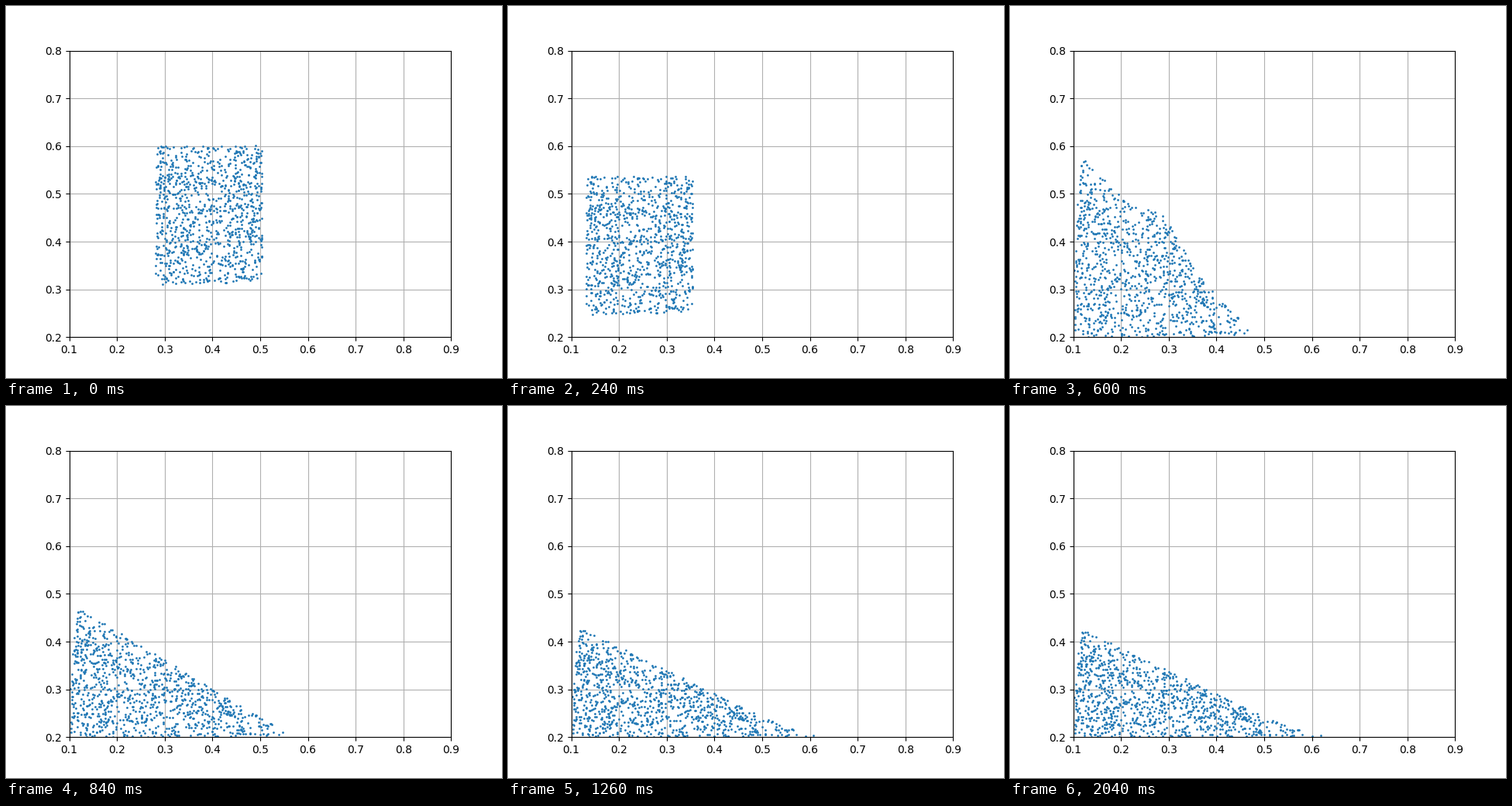
Recreate the animation shown at these times as a matplotlib script. Size 640x480 px, loop 2.1 s.

```python
import numpy as np
import matplotlib.pyplot as plt
from matplotlib.animation import FuncAnimation

FRAMES, INTERVAL = 70, 30
COUNT = 1000
FLOOR, WALL = 0.2, 0.102
IMPACT, REST = 9.3, 68      # in frames
VX = -0.01875               # block velocity per frame

rng = np.random.default_rng(12)
u, v = rng.random((2, COUNT))


def block(t):
    """Rigid block of sand in free flight."""
    x = 0.2805 + 0.2245 * u + VX * t
    y = 0.3107 + 0.29 * v - 0.0035 * t - 0.00056 * t**2
    return np.array([x, y])


# Equal-area map of the unit square to a right triangle,
# then to column rank and relative height.
low = u > v
tx = np.where(low, u - v / 2, u / 2)
ty = np.where(low, v / 2, v - u / 2)
rank = 1 - (1 - tx)**2
level = ty / (1 - tx)


def heap(slope, foot, soft, bulge=0):
    """Spread the grains evenly below a slope that runs out softly at its foot."""
    def surface(x):
        h = slope * soft * np.logaddexp(0, (foot - x) / soft)
        h += bulge * np.exp(-((x - 0.29) / 0.05)**2)
        return h * (1 - 0.55 * np.exp(-((x - 0.1) / 0.011)**2))

    xs = np.linspace(WALL, foot + 5 * soft, 800)
    area = np.cumsum(surface(xs))
    x = np.interp(rank, (area - area[0]) / (area[-1] - area[0]), xs)
    return np.array([x, FLOOR + level * surface(x)])


times = np.array([IMPACT, 20, 28, 35, 51, REST])
poses = np.array([
    block(IMPACT),
    heap(1.03, 0.485, 0.002, bulge=0.05),
    heap(0.60, 0.570, 0.006),
    heap(0.50, 0.585, 0.022),
    heap(0.48, 0.590, 0.031),
    heap(0.478, 0.590, 0.031),
])


def tangents():
    """Monotone slopes, with a free one at the top of the splash."""
    s = np.diff(poses, axis=0) / np.diff(times)[:, None, None]
    a, b = s[:-1], s[1:]
    same = a * b > 0
    d = np.zeros_like(poses)
    d[1:-1] = np.where(same, 2 * a * b / np.where(same, a + b, 1), 0)
    d[1] = np.gradient(poses, times, axis=0)[1]
    d[0] = [VX * u, -0.0139 * (0.3 + 0.4 * u)]
    return d


slopes = tangents()


def grains(t):
    if t <= IMPACT:
        return block(t)
    k = min(np.searchsorted(times, t, side="right") - 1, len(times) - 2)
    dt = times[k + 1] - times[k]
    s = (t - times[k]) / dt
    p = (poses[k] * (1 + 2 * s) * (1 - s)**2
         + poses[k + 1] * s**2 * (3 - 2 * s)
         + slopes[k] * dt * s * (1 - s)**2
         - slopes[k + 1] * dt * s**2 * (1 - s))
    return np.maximum(p, [[WALL], [FLOOR]])


fig, ax = plt.subplots(figsize=(6.4, 4.8), dpi=100)
ax.set_aspect("equal")
ax.set_xlim(0.1, 0.9)
ax.set_ylim(0.2, 0.8)
ax.grid(True)
dots, = ax.plot([], [], ".", color="C0", markersize=2)


def update(i):
    dots.set_data(*grains(min(i, REST)))
    return dots,


anim = FuncAnimation(fig, update, frames=FRAMES, interval=INTERVAL,
                     init_func=lambda: update(0), repeat=True, repeat_delay=0)
plt.show()
```
